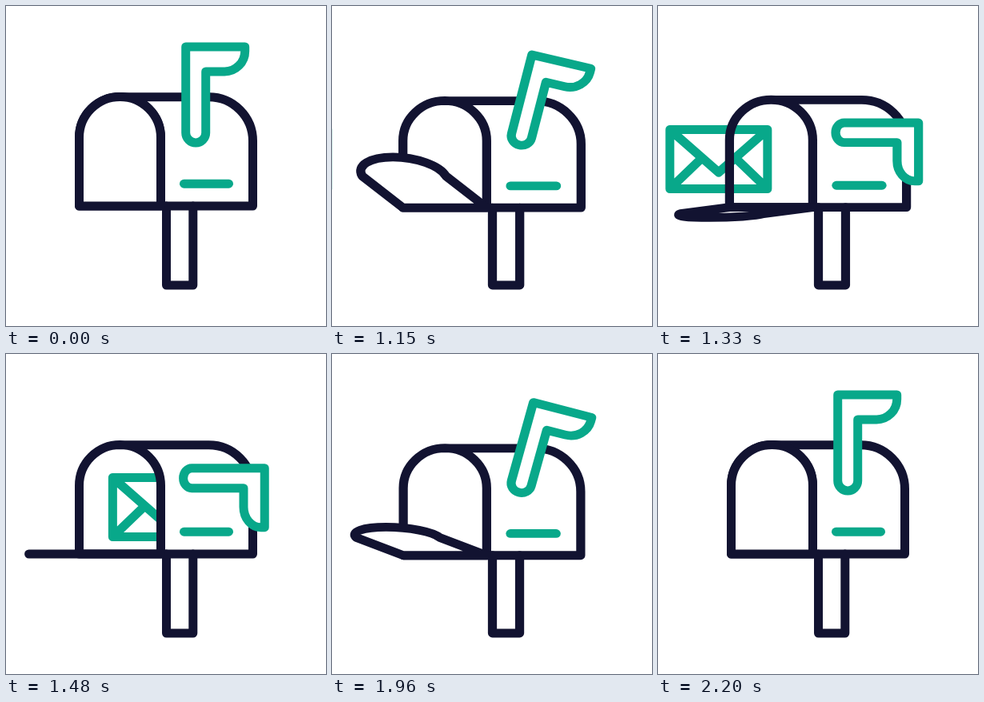
Recreate the animation shown at these times as an HTML page. Size 400 by 400 pixels, loop 2.23 s.

```html
<!DOCTYPE html>
<html lang="en">
<head>
<meta charset="utf-8">
<title>Mailbox</title>
<style>
  html, body { margin: 0; width: 100%; height: 100%; overflow: hidden; background: #fff; }
  svg { display: block; width: 100%; height: 100%; }
  .line { fill: none; stroke-width: 11; stroke-linecap: round; stroke-linejoin: round; }
  .navy { stroke: #121331; }
  .green { stroke: #08a88a; }
  .solid { fill: #fff; }
</style>
</head>
<body>
<svg viewBox="0 0 400 400">
  <clipPath id="opening"><rect width="193.5" height="400"/></clipPath>
  <g clip-path="url(#opening)">
    <path id="letter" class="line green" d="M0 154.5H122V228.5H0Z L61 208 122 154.5M0 228.5 39 191M122 228.5 83 191"/>
  </g>
  <g id="box">
    <path class="line navy" d="M200.5 250V349H233.8V250"/>
    <path class="line navy" d="M91.5 250V164.5a51 51 0 0 1 102 0V250M142.5 113.7H253.5a55 55 0 0 1 55 55V250H91.5"/>
    <path id="lid" class="line navy solid"/>
    <path class="line green" d="M222.5 222.2H278.5"/>
    <path id="flag" class="line green solid"/>
  </g>
</svg>
<script>
const LOOP = 2230, START = 1030, STEP = 30;
const el = id => document.getElementById(id);
const letter = el('letter'), box = el('box'), lid = el('lid'), flag = el('flag');

const part = (t, from, to) => Math.min(1, Math.max(0, (t - from) / (to - from)));
const ease = (t, from, to) => (1 - Math.cos(Math.PI * part(t, from, to))) / 2;
const rad = deg => deg * Math.PI / 180;

// Lean back, swing down, swing up past upright, settle
const flagAngle = t => -9 * ease(t, 1000, 1070) + 99 * ease(t, 1070, 1321)
  - 100 * ease(t, 1840, 2020) + 10 * ease(t, 2070, 2200);

// Drop past level, recover, then close
const lidAngle = t => 101 * ease(t, 1030, 1240) - 11 * ease(t, 1240, 1420)
  - 90 * part(t, 1840, 2180) ** 1.7;

const squash = t => ease(t, 1000, 1210) - ease(t, 1240, 1450)
  + 1.05 * (ease(t, 1840, 2040) - ease(t, 2080, 2200));

// Tilts the front arch around its bottom edge
function drawLid(angle) {
  const sin = Math.sin(rad(angle)), cos = Math.cos(rad(angle));
  const at = (x, h) => `${x - .3 * h * sin - 35 * sin * sin} ${250 - h * cos} `;
  lid.setAttribute('d', 'M91.5 250L' + at(91.5, 85.5)
    + 'C' + at(91.5, 113.7) + at(114.3, 136.5) + at(142.5, 136.5)
    + at(170.7, 136.5) + at(193.5, 113.7) + at(193.5, 85.5) + 'L193.5 250Z');
}

// The flag shortens as it swings down, while its line weight stays the same
function drawFlag(angle) {
  const s = Math.max(0, Math.sin(rad(angle))), drop = 1 - Math.cos(rad(angle));
  const k = 1 - .153 * s;
  flag.setAttribute('d', `M-12.5 ${-107.5 * k}H61.5V${-102 * k}A25.5 ${25.5 * k} 0 0 1 36 ${-76.5 * k}`
    + `H12.5V0A12.5 ${12.5 * k} 0 0 1 -12.5 0Z`);
  flag.setAttribute('transform',
    `translate(${237.2 - 5 * s} ${158.4 - 3.2 * drop}) rotate(${angle})`);
}

function draw(t) {
  const s = squash(t);
  box.setAttribute('transform',
    `translate(200 349) scale(${1 + .032 * s} ${1 - .026 * s}) translate(-200 -349)`);
  drawLid(lidAngle(t));
  drawFlag(flagAngle(t));
  letter.setAttribute('transform', `translate(${-140 + 350 * part(t, 1134, 1577)})`);
}

function tick() {
  const t = performance.now() % LOOP;
  draw(t < START ? 0 : START + Math.floor((t - START) / STEP) * STEP);
  requestAnimationFrame(tick);
}
tick();
</script>
</body>
</html>
```
